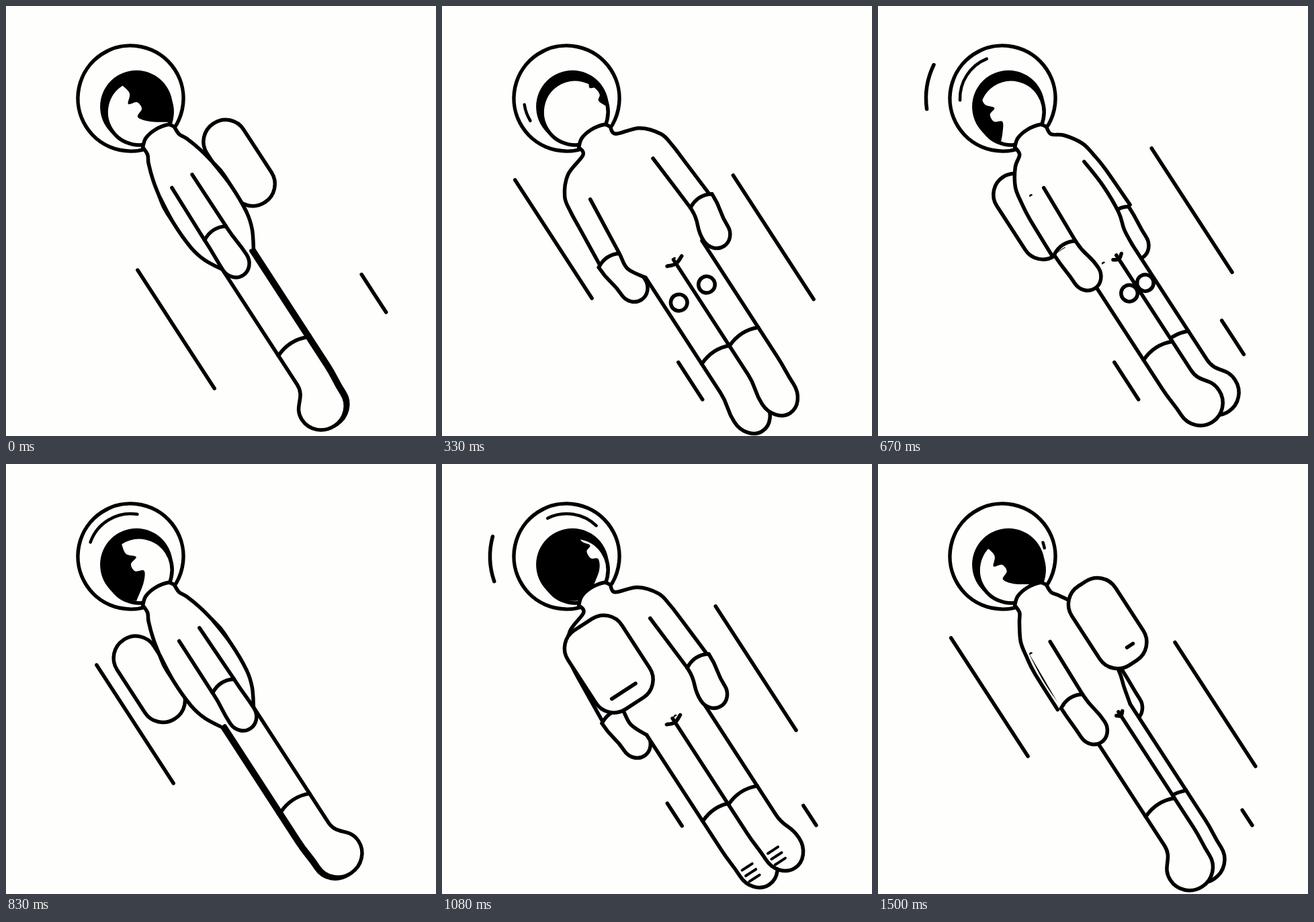
An HTML page with a canvas that plays this animation: 640x640 px, repeating every 1580 ms.

```html
<!DOCTYPE html>
<html lang="en">
<head>
<meta charset="utf-8">
<title>Drifting astronaut</title>
<style>
html, body { margin: 0; height: 100%; overflow: hidden; background: #fefefc; }
canvas { display: block; width: 100vw; height: 100vh; }
</style>
</head>
<body>
<canvas id="stage" width="640" height="640"></canvas>
<script>
const c = document.getElementById('stage').getContext('2d');
const LOOP = 1580, STEPS = 19, FRONT = 5;
const INK = '#000', PAPER = '#fefefc', TILT = 33;
const rad = deg => deg * Math.PI / 180;
const clamp = (v, lo, hi) => Math.max(lo, Math.min(hi, v));

// Outline rows: y, half width in profile, extra width the arms add from the front.
const OUTLINE = [[71,28,0], [84,28,20], [96,34,50], [121,42,65], [145,47,65], [172,51,63], [236,49,70]];
// Waist rows: y, half width.
const WAIST = [[145,47], [190,51], [236,49], [262,42]];
// One side of the hairline: longitude, y.
const HAIRLINE = [[92,-30], [100,-8], [84,5], [103,10], [104,22], [86,29], [103,44], [140,60]];
// Wind lanes: x, visible top and bottom, streak length, launch steps.
const LANES = [
  [-134, 57, 458, 210, [4, 9.7, 14.6, 18]],
  [142, 154, 474, 220, [2.9, 7.2, 12.2, 16.8]],
  [-78, 390, 538, 66, [2.2, 6.2, 11.55, 13.6]],
  [90, 406, 538, 60, [6, 9.17, 10.7, 14.35, 15.65]]
];
// Gusts around the helmet: step -> starting angle.
const GUSTS = { 8: 172, 11: 270, 13: 161, 16: 300 };

// Smooth curve through points; joins the current path unless fresh.
function curve(p, fresh = true) {
  const pt = i => p[clamp(i, 0, p.length - 1)];
  fresh ? c.moveTo(...p[0]) : c.lineTo(...p[0]);
  for (let i = 0; i < p.length - 1; i++) {
    const [a, b, d, e] = [pt(i - 1), pt(i), pt(i + 1), pt(i + 2)];
    c.bezierCurveTo(b[0] + (d[0] - a[0]) / 6, b[1] + (d[1] - a[1]) / 6,
      d[0] - (e[0] - b[0]) / 6, d[1] - (e[1] - b[1]) / 6, ...d);
  }
}

function fill(color, draw) {
  c.beginPath();
  draw();
  c.fillStyle = color;
  c.fill();
}

function ink(draw, paper = false, width = 5.5) {
  if (paper) fill(PAPER, draw);
  c.beginPath();
  draw();
  c.lineWidth = width;
  c.stroke();
}

const line = (p, width) => ink(() => curve(p), false, width);
const circle = (x, y, r, paper) => ink(() => c.arc(x, y, r, 0, 7), paper);
const arc = (r, from, to, width) => ink(() => c.arc(-3.5, 0, r, rad(from + TILT), rad(to + TILT)), false, width);
const mirror = p => p.map(([x, y]) => [-x, y]);

function cuff(x, half, y) {
  ink(() => {
    c.moveTo(x - half, y);
    c.quadraticCurveTo(x, y - 11, x + half, y);
  });
}

function drawWind(s) {
  for (const [x, top, bottom, length, launches] of LANES)
    for (const launch of launches) {
      // A late launch runs on into the next loop.
      const age = s + (s < launch - STEPS / 2 ? STEPS : 0) - launch;
      const y = 165 + 160 * age;
      const from = Math.max(top, y - length / 2), to = Math.min(bottom, y + length / 2);
      if (to > from) line([[x, from], [x, to]]);
    }
  if (s in GUSTS) arc(114, GUSTS[s], GUSTS[s] + 34);
}

function drawPack(sin, cos) {
  const back = Math.max(0, -cos), w = 62 + 38 * back;
  const x = -80 * sin, y = 168.5;
  ink(() => c.roundRect(x - w / 2, y - 70, w, 140, Math.min(32, w / 2)), true);
  const seam = 33 * (back - .24), mid = x - 3 - 20 * sin ** 5;
  if (seam > 0) line([[mid - seam, y + 46], [mid + seam, y + 46]]);
}

function drawHead(s, turn) {
  circle(-3.5, 0, 78.5, true);
  const glint = 40 * Math.sin(Math.PI * (s - 2.5) / 16), mid = 160 + 13.2 * (s - 4);
  if (glint > 0) arc(63.5, mid - glint, mid + glint, 4.5);

  fill(INK, () => c.arc(-3, 15, 54, 0, 7));
  const project = ([lon, y]) => [-4 + 50 * Math.sin(rad(clamp(.75 * (lon + turn), -90, 90))), y];
  const right = HAIRLINE.map(project);
  const left = HAIRLINE.map(([lon, y]) => project([-lon, y])).reverse();
  c.save();
  c.beginPath();
  c.arc(-4, 24, 49, 0, 7);
  c.clip();
  fill(PAPER, () => {
    curve(right);
    c.lineTo(right.at(-1)[0], 80);
    c.lineTo(left[0][0], 80);
    curve(left, false);
  });
  c.restore();
  circle(-4, 24, 49);
}

// Extra half width where the arms swing out to the side.
const spread = (half, arms, open) => half + Math.max(0, arms * open - 18);
const reach = y => 78 + 8 * (y - 145) / 91;

function drawShoulders(open) {
  const right = OUTLINE.map(([y, half, arms]) => [spread(half, arms, open), y]);
  ink(() => {
    curve(mirror(right).reverse());
    curve([[-28, 71], [-17, 62], [2, 59], [22, 63], [28, 71]], false);
    curve(right, false);
  }, true);
}

function drawWaist(open) {
  const right = WAIST.map(([y, half]) => [Math.max(half, open * reach(y) - 18), y]);
  right.push([25.5 + 26 * open, 288]);
  const left = mirror(right);
  fill(PAPER, () => {
    curve(right);
    curve([...left].reverse(), false);
  });
  line(right);
  line(left);
}

// Sides run down to a rounded end; the end may sit off centre.
function limb(x, half, top, bend, endX, endY, rx, ry) {
  const mid = (bend + endY) / 2;
  ink(() => {
    c.moveTo(x - half, top);
    c.lineTo(x - half, bend);
    c.bezierCurveTo(x - half, mid, endX - rx, mid, endX - rx, endY);
    c.ellipse(endX, endY, rx, ry, 0, Math.PI, 0, true);
    c.bezierCurveTo(endX + rx, mid, x + half, mid, x + half, bend);
    c.lineTo(x + half, top);
  }, true);
}

function drawGlove(n) {
  const x = 86 * n;
  limb(x, 19, 237, 240, x * .9, 289, 21, 23);
  cuff(x, 19, 237);
}

function drawSleeve(n) {
  const open = Math.abs(n);
  const top = spread(47, 65, open), low = spread(49, 70, open);
  const edges = [-1, 1].map(side => [
    [clamp(78 * n + 18 * side, 3 - top, top - 3), 145],
    [clamp(86 * n + 19 * side, 3 - low, low - 3), 236]
  ]);
  fill(PAPER, () => {
    curve(edges[0]);
    curve([...edges[1]].reverse(), false);
  });
  edges.filter(e => Math.abs(e[0][0]) < top - 6).forEach(e => line(e));
}

function drawLeg(n, sin, cos) {
  const x = 26 * n, toe = 23 * sin;
  limb(x, 25.5, 288, 492, x + .55 * toe, 540, 24 + .5 * Math.abs(toe), 34);
  cuff(x, 25.5, 441);
  if (cos > .3) circle(x + 13 * sin, 346, 12.3);
  if (cos < -.7) {
    const mid = x + 2 - 19 * sin;
    for (let y = 534; y < 560; y += 10) line([[mid - 9, y], [mid + 9, y]], 4);
  }
}

function draw(s) {
  const turn = (s - FRONT) * 360 / STEPS, wrapped = turn > 180 ? turn - 360 : turn;
  const sin = Math.sin(rad(turn)), cos = Math.cos(rad(turn)), open = Math.abs(cos);
  // Sideways position of the nearer arm and leg; the farther ones mirror it.
  const near = sin < 0 ? cos : -cos;
  const packInFront = cos < -.2;

  c.resetTransform();
  c.fillStyle = PAPER;
  c.fillRect(0, 0, 640, 640);
  c.translate(185.5, 137.5);
  c.rotate(rad(-TILT));
  c.translate(3.5, 0);

  drawWind(s);
  if (!packInFront) drawPack(sin, cos);
  drawHead(s, wrapped);
  drawShoulders(open);
  drawGlove(-near);
  drawWaist(open);
  drawLeg(-near, sin, cos);
  drawLeg(near, sin, cos);
  if (open > .15) {
    const x = 26 * near - 25.5 * Math.sign(near), half = 14 * open;
    line([[x - half, 291], [x, 295], [x + half, 290]]);
  }
  drawSleeve(near);
  drawGlove(near);
  if (packInFront) drawPack(sin, cos);
}

// Steps last 80, 90 and 80 ms in turn.
function stepAt(t) {
  const r = t % 250;
  return 3 * Math.floor(t / 250) + (r >= 80) + (r >= 170);
}

c.lineCap = c.lineJoin = 'round';
c.strokeStyle = INK;
const start = performance.now();
let shown = -1;
function tick() {
  const s = stepAt((performance.now() - start) % LOOP);
  if (s !== shown) draw(shown = s);
  requestAnimationFrame(tick);
}
tick();
</script>
</body>
</html>
```
